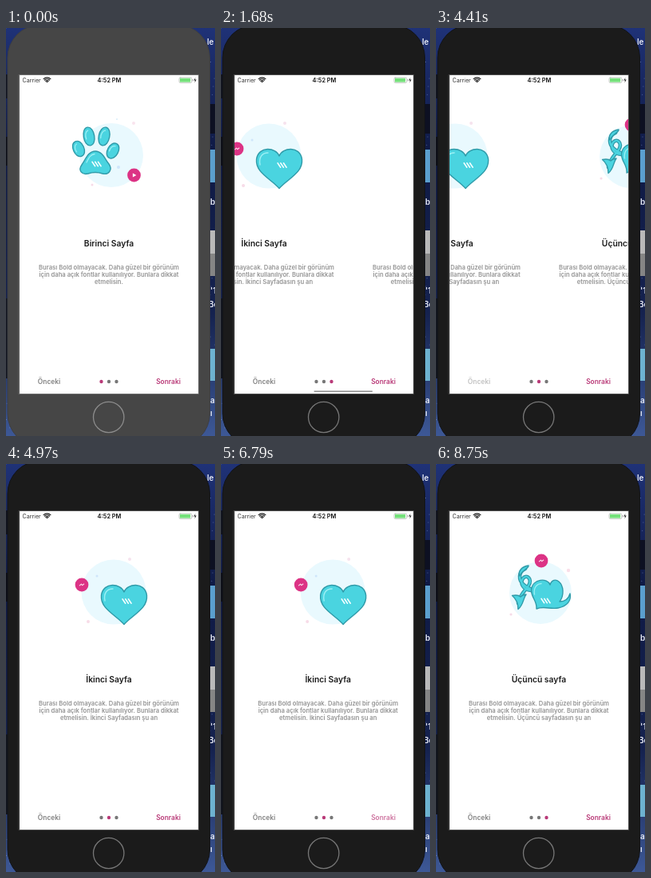
Write an HTML page with a canvas that moves like this. It is 262 px wide and 510 px high and loops after 8820 ms.

```html
<!DOCTYPE html>
<html lang="tr">
<head>
<meta charset="utf-8">
<title>Sayfalar</title>
<style>
html, body { margin: 0; width: 262px; height: 510px; overflow: hidden; background: #13204f; }
canvas { display: block; width: 262px; height: 510px; }
</style>
</head>
<body>
<canvas id="stage"></canvas>
<script>
const W = 262, H = 510, LOOP = 8820;
const SCREEN = { x: 17, y: 59, w: 224, h: 398 };
const FONT = 'Inter, "Open Sans", sans-serif';
const PINK = '#b93a78', BADGE = '#dc3385', TEAL = '#4ad4e0', EDGE = '#2f9aa8', PALE = '#e9f9fe', SHINE = '#9bf0f4';
const FOCUS_AT = 280;

// Page changes: swipes by finger, then taps on the two buttons.
const MOVES = [
  { start: 400, end: 1150, from: 0, to: 1, swipe: true },
  { start: 1390, end: 2140, from: 1, to: 2, swipe: true },
  { start: 4250, end: 4570, from: 2, to: 1, button: 'prev' },
  { start: 5130, end: 5450, from: 1, to: 0, button: 'prev' },
  { start: 6500, end: 6820, from: 0, to: 1, button: 'next' },
  { start: 6917, end: 7237, from: 1, to: 2, button: 'next' }
];

const PAGES = [
  { title: 'Birinci Sayfa', tail: '', draw: drawPaw },
  { title: 'İkinci Sayfa', tail: ' İkinci Sayfadasın şu an', draw: drawHeart },
  { title: 'Üçüncü sayfa', tail: ' Üçüncü sayfadasın şu an', draw: drawVine }
];

const canvas = document.getElementById('stage');
const ctx = canvas.getContext('2d');
const dpr = window.devicePixelRatio || 1;
canvas.width = W * dpr;
canvas.height = H * dpr;

const clamp = v => Math.max(0, Math.min(1, v));
const smooth = u => u * u * (3 - 2 * u);

function state(t) {
  const s = { pos: 0, dot: 0, bar: 0, prev: 1, next: 1 };
  for (const m of MOVES) {
    const u = clamp((t - m.start) / (m.end - m.start));
    if (t >= m.start) s.pos = m.from + (m.to - m.from) * smooth(u);
    if (m.swipe) {
      if (u > 0.33) s.dot = m.to;
      if (t >= m.start) s.bar = clamp(1 - (t - m.end - 150) / 250);
    } else {
      if (t >= m.start) s.dot = m.to;
      if (t >= m.start - 85) s[m.button] = 0.2 + 0.8 * clamp((t - m.start) / 450);
    }
  }
  return s;
}

function rect(x, y, w, h, color) {
  ctx.fillStyle = color;
  ctx.fillRect(x, y, w, h);
}

function disc(x, y, r, color) {
  ctx.fillStyle = color;
  ctx.beginPath();
  ctx.arc(x, y, r, 0, Math.PI * 2);
  ctx.fill();
}

function text(str, x, y, size, weight, color, align = 'center') {
  ctx.font = `${weight} ${size}px ${FONT}`;
  ctx.textAlign = align;
  ctx.fillStyle = color;
  ctx.fillText(str, x, y);
}

function line(d, color, width) {
  ctx.strokeStyle = color;
  ctx.lineWidth = width;
  ctx.stroke(new Path2D(d));
}

function shape(d) {
  ctx.fillStyle = TEAL;
  ctx.fill(new Path2D(d));
  line(d, EDGE, 1.4);
}

function stripes(x, y) {
  for (let i = 0; i < 3; i++) {
    line(`M${x + i * 3.7} ${y - 2.7}l3.700 5.400`, '#f2feff', 1.6);
  }
}

function badge(x, y, play) {
  disc(x, y, 8.4, BADGE);
  if (play) {
    ctx.fillStyle = '#fff';
    ctx.fill(new Path2D(`M${x - 1.6} ${y - 2.5}l4.5 2.5l-4.5 2.5z`));
  } else {
    line(`M${x - 2.7} ${y + 0.9}l2.1 -1.800l1.300 1.500l2 -1.600`, '#fbe3ef', 1.1);
  }
}

function toe(x, y, rx, ry, deg) {
  ctx.save();
  ctx.translate(x, y);
  ctx.rotate(deg * Math.PI / 180);
  shape(`M0 ${-ry}C${rx * 1.2} ${-ry} ${rx * 1.2} ${ry} 0 ${ry}C${-rx * 1.2} ${ry} ${-rx * 1.2} ${-ry} 0 ${-ry}Z`);
  line(`M${-rx * 0.5} ${ry * 0.25}C${-rx * 0.65} ${-ry * 0.2} ${-rx * 0.4} ${-ry * 0.6} 0 ${-ry * 0.65}`, SHINE, 1.2);
  ctx.restore();
}

function drawPaw() {
  disc(132, 159, 40, PALE);
  disc(160, 119, 2, '#f9e4ee');
  disc(108, 196, 1.5, '#f6dbe8');
  disc(141, 174, 2, '#cfe6fb');
  disc(139, 114, 1, '#d8eefa');
  toe(91, 151, 7.5, 10, -24);
  toe(104, 135.5, 7.5, 11.5, -10);
  toe(123, 135.5, 7.5, 11.5, 12);
  toe(134, 153.5, 7.5, 10, 28);
  shape('M112 154C121 154 124 164 129 170C134 177 129 184 121 182C115 180 109 180 103 182C95 184 90 178 95 171C100 164 103 154 112 154Z');
  line('M101 168C104 162 106 158 111 157.5', SHINE, 1.3);
  stripes(108, 170);
  badge(160.5, 184, true);
}

function drawHeart() {
  disc(135, 160, 40.5, PALE);
  disc(155, 119, 2, '#f6e3ee');
  disc(103, 197, 2, '#f7dce8');
  disc(114, 140, 1.5, '#cfe6fb');
  shape('M148 160C144 149 122 147 119.500 164C118 181 137 188 148 200.500C159 188 178 181 176.500 164C174 147 152 149 148 160Z');
  line('M124 171C122 161 127 156 134 156', SHINE, 1.4);
  stripes(146, 171.5);
  badge(95, 151, false);
}

function drawVine() {
  disc(131, 161, 39, PALE);
  disc(166, 133, 2.2, '#f9dfe9');
  disc(94, 188, 1.6, '#f6dbe8');
  const stem = 'M112 131C103 135 103 145 110 151C115 156 121 157 127 159M103 174C105 163 112 158 116 152C121 144 114 137 109 143C105 149 109 157 119 158';
  line(stem, EDGE, 4.6);
  line(stem, TEAL, 2.2);
  shape('M104.500 140C103 133 108 128 116 127C116.500 130 109 132 104.500 140Z');
  shape('M103 181.500C103 175 101 169 95.500 164.500C101 163.500 104 164 106 166C108 164 110 163 113 163C109 168 110 176 103 181.500Z');
  // upright heart whose tip runs out into a curl on the right
  shape('M143 151C140 142 121 143 119.500 157C119 167 127 171 126 181C135 177 144 182 153 180C164 178 170 171 168 162C166 169 161 172 155 172C161 164 160 152 154 147C150 143.500 145 145 143 151Z');
  line('M123.500 163C122 155 126 150 132 149.500', SHINE, 1.3);
  stripes(132, 171);
  badge(132, 121, false);
}

function drawPage(page) {
  page.draw();
  text(page.title, 129, 273, 10.3, 600, '#1c1c1c');
  const lines = [
    'Burası Bold olmayacak. Daha güzel bir görünüm',
    'için daha açık fontlar kullanılıyor. Bunlara dikkat',
    'etmelisin.' + page.tail
  ];
  lines.forEach((s, i) => text(s, 129, 301.5 + i * 9.2, 7.65, 600, '#949494'));
}

function drawDesktop() {
  const g = ctx.createLinearGradient(0, 0, 0, H);
  g.addColorStop(0, '#1f3277');
  g.addColorStop(0.3, '#0f1a45');
  g.addColorStop(0.7, '#15224f');
  g.addColorStop(1, '#3d5896');
  rect(0, 0, W, H, g);
  for (let i = 0; i < 26; i++) {
    const x = i % 3 ? 255 + (i * 3.7) % 7 : (i * 2.3) % 9;
    disc(x, (i * 83.3) % H, 0.5, 'rgba(150,175,235,.6)');
  }
  rect(0, 58, 3, 30, '#10131f');
  rect(0, 136, 3, 36, '#0b0d16');
  rect(0, 338, 3, 100, '#11141f');
  rect(255, 95, 7, 37, '#0d1022');
  rect(255, 152, 7, 41, '#5b9fce');
  rect(255, 253, 7, 57, '#b9b9b9');
  rect(255, 282, 7, 28, '#858585');
  rect(255, 401, 7, 40, '#6db2d0');
  const labels = [['le', 252, 21], ['b', 256, 221], ["'1", 256, 332], ['Bo', 254, 349], ['a', 256, 469], ['ı', 256, 485]];
  for (const [s, x, y] of labels) text(s, x, y, 10, 600, '#e8ebf5', 'left');
}

function drawBody(focused) {
  ctx.beginPath();
  ctx.roundRect(2, -4, 253.5, 527, 41);
  ctx.fillStyle = focused ? '#1b1b1b' : '#464646';
  ctx.fill();
  ctx.strokeStyle = focused ? '#111318' : '#3d3e42';
  ctx.lineWidth = 1;
  ctx.stroke();
  ctx.beginPath();
  ctx.arc(128.7, 486.5, 19.2, 0, Math.PI * 2);
  ctx.strokeStyle = focused ? '#777' : '#8c8c8c';
  ctx.lineWidth = 1.3;
  ctx.stroke();
  ctx.strokeStyle = focused ? '#505050' : '#707070';
  ctx.lineWidth = 1;
  ctx.strokeRect(SCREEN.x - 0.5, SCREEN.y - 0.5, SCREEN.w + 1, SCREEN.h + 1);
}

function drawStatus() {
  text('Carrier', 20.5, 67.5, 7.1, 400, '#333', 'left');
  text('4:52 PM', 129.5, 67.5, 7.4, 600, '#111');
  for (const r of [2.2, 4.2, 6.2]) {
    ctx.beginPath();
    ctx.arc(51.5, 68, r, -Math.PI * 0.75, -Math.PI * 0.25);
    ctx.strokeStyle = '#222';
    ctx.lineWidth = 1.3;
    ctx.stroke();
  }
  disc(51.5, 67.3, 0.9, '#222');
  ctx.beginPath();
  ctx.roundRect(217, 61.8, 15.8, 6.8, 1.8);
  ctx.strokeStyle = '#b0b6b0';
  ctx.lineWidth = 0.7;
  ctx.stroke();
  rect(218, 62.8, 13.2, 4.8, '#74e07a');
  rect(233.6, 64, 0.9, 2.4, '#999');
  ctx.fillStyle = '#222';
  ctx.fill(new Path2D('M237.400 62l-2 3.600h1.600l-.5 2.800l2.200 -3.800h-1.700z'));
}

function drawControls(s) {
  ctx.globalAlpha = s.prev;
  text('Önceki', 54, 445, 8.4, 600, '#808080');
  ctx.globalAlpha = s.next;
  text('Sonraki', 203.5, 445, 8.4, 600, PINK);
  ctx.globalAlpha = 1;
  for (let i = 0; i < 3; i++) {
    disc(119.5 + i * 9.5, 442, 2.2, i === s.dot ? PINK : '#777');
  }
  ctx.globalAlpha = s.bar;
  rect(SCREEN.x + s.pos * SCREEN.w / 3, 453.5, SCREEN.w / 3 - 1.5, 1.4, '#858585');
  ctx.globalAlpha = 1;
}

function render(t) {
  const s = state(t);
  ctx.setTransform(dpr, 0, 0, dpr, 0, 0);
  ctx.lineCap = ctx.lineJoin = 'round';
  drawDesktop();
  drawBody(t >= FOCUS_AT);
  ctx.save();
  ctx.beginPath();
  ctx.rect(SCREEN.x, SCREEN.y, SCREEN.w, SCREEN.h);
  ctx.clip();
  rect(SCREEN.x, SCREEN.y, SCREEN.w, SCREEN.h, '#fff');
  PAGES.forEach((page, i) => {
    const dx = (i - s.pos) * SCREEN.w;
    if (Math.abs(dx) >= SCREEN.w) return;
    ctx.save();
    ctx.translate(dx, 0);
    drawPage(page);
    ctx.restore();
  });
  drawStatus();
  drawControls(s);
  ctx.restore();
}

const origin = performance.now();
function tick() {
  render((performance.now() - origin) % LOOP);
  requestAnimationFrame(tick);
}
tick();
</script>
</body>
</html>
```
